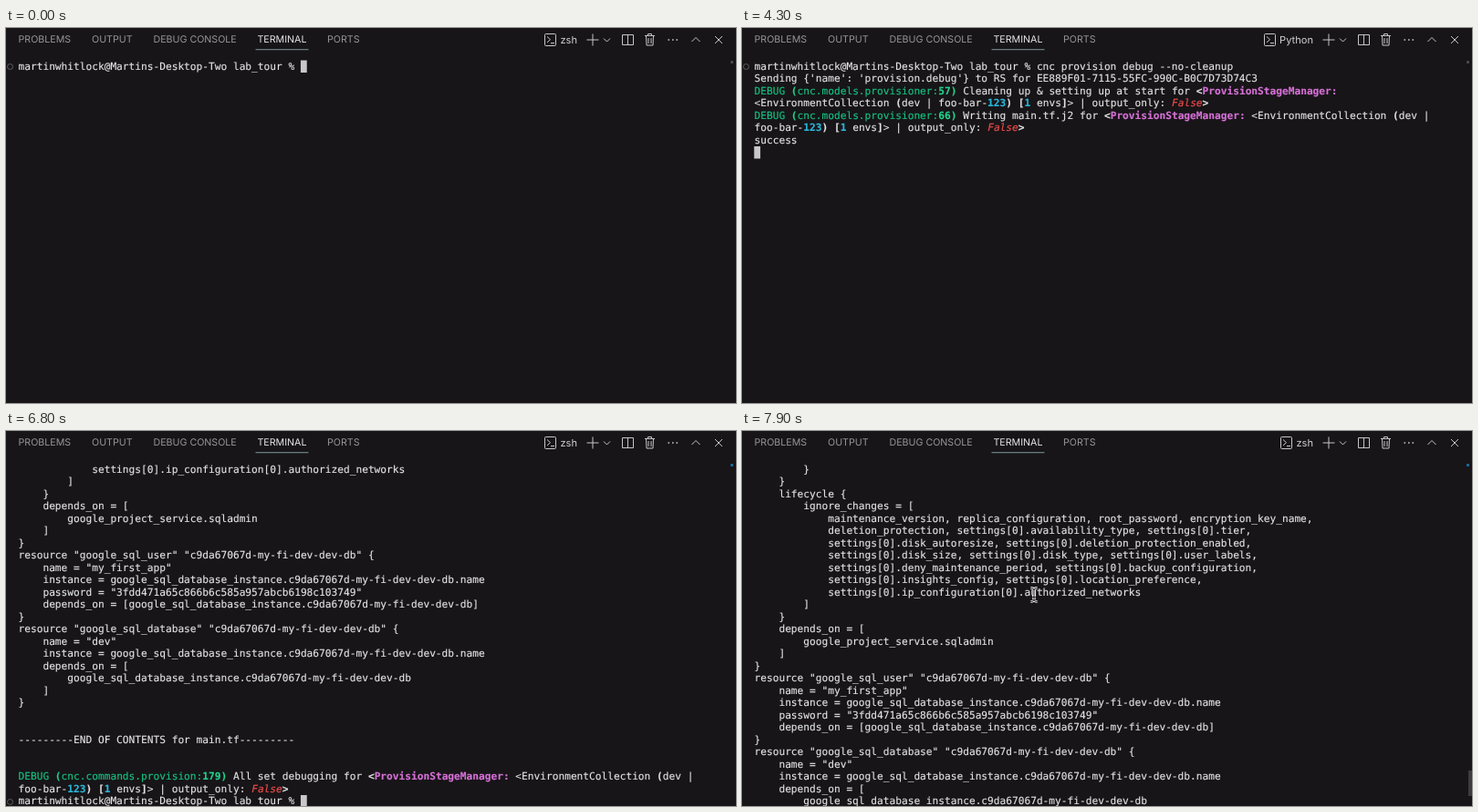
Write an HTML page that moves like this. It is 800x412 px and loops after 8 s.

```html
<!DOCTYPE html>
<html lang="en">
<head>
<meta charset="utf-8">
<title>Terminal session</title>
<style>
  html, body { margin: 0; width: 100%; height: 100%; overflow: hidden; background: #171518; }
  #stage { position: relative; width: 800px; height: 412px; overflow: hidden; background: #171518;
    text-rendering: geometricPrecision; }
  #stage > * { position: absolute; }
  .tab, #shell { top: 5px; line-height: 16px; white-space: pre; color: #979698;
    font-family: Inter, Roboto, sans-serif; font-size: 10.65px; }
  .tab.on { color: #e7e7e7; }
  #shell { right: 174px; color: #d0d0d0; font-size: 11.1px; }
  svg { left: 0; top: 0; fill: none; stroke: #c6c6c6; stroke-width: 1; }
  #screen { left: 0; top: 0; width: 800px; height: 412px; }
  .row { position: absolute; left: 13.5px; height: 13.5px; line-height: 13.5px; white-space: pre;
    color: #e2e2e2; font-family: "DejaVu Sans Mono", "Noto Sans Mono", monospace; font-size: 11.18px;
    -webkit-text-stroke: 0.15px; }
  #caret { fill: #c8c8c8; stroke: none; }
  #underline { fill: #82969a; stroke: none; }
  #ring { left: 1px; width: 5px; height: 5px; border: 1px solid #5f5e61; border-radius: 50%; }
  #dot { left: 793.5px; top: 35.5px; width: 3px; height: 3px; border-radius: 1px; }
  #thumb { left: 796px; width: 4px; height: 28px; background: #3d3c3f; }
  .b { font-weight: bold; }
  .green, .str { color: #16c280; }
  .green.b { color: #23d18b; }
  .blue { color: #3888e2; }
  .blue.b { color: #3b8eea; }
  .tag { color: #d670d6; font-weight: bold; }
  .num { color: #29b8db; font-weight: bold; }
  .yes { color: #23d18b; font-style: italic; }
  .no { color: #f14c4c; font-style: italic; }
  .url { color: #3b8eea; text-decoration: underline 1px; }
</style>
</head>
<body>
<div id="stage">
  <span class="tab" style="left:13.5px">PROBLEMS</span>
  <span class="tab" style="left:94px">OUTPUT</span>
  <span class="tab" style="left:161.5px">DEBUG CONSOLE</span>
  <span class="tab on" style="left:275.5px">TERMINAL</span>
  <span class="tab" style="left:352px">PORTS</span>
  <span id="shell"></span>
  <svg width="800" height="412">
    <rect id="underline" x="273.500" y="23.200" width="58" height="1"/>
    <g id="prompt"><rect x="590.5" y="6.5" width="12" height="13" rx="1"/><path d="M593 9.5l3.5 3.2-3.5 3.2M597 16.5h4"/></g>
    <path d="M636.5 13h13M643 6.5v13M655 11.5l3.5 3.5 3.5-3.5"/>
    <path d="M675.5 7.5h12v11h-12zM681.5 7.5v11"/>
    <path d="M700 8.5h11M703.5 8.5v-2h4v2M701.5 8.5l.5 10.5h7l.5-10.5M704 11v6M707 11v6"/>
    <path d="M725.5 13h1.6M730 13h1.6M734.5 13h1.6" stroke-width="1.6"/>
    <path d="M751.5 15l4.5-4.5 4.5 4.5M777 9l8 8M785 9l-8 8"/>
    <rect id="caret" width="6.800" height="13.500"/>
  </svg>
  <div id="screen"></div>
  <div id="ring"></div>
  <div id="dot"></div>
  <div id="thumb"></div>
  <svg id="mouse" width="16" height="22" style="left:312px;top:169px">
    <defs><path id="beam" d="M4.5 3.5q3 0 3.5 2q.5-2 3.5-2M8 5v12M4.5 18.5q3 0 3.5-2q.5 2 3.5 2M6 13.5h4"/></defs>
    <use href="#beam" stroke="#f2f2f2" stroke-width="2.8"/>
    <use href="#beam" stroke="#111"/>
  </svg>
</div>
<script>
const LOOP = 8000, TOP = 35.5, LEFT = 13.5, ROW = 13.5, COL = 6.731, VISIBLE = 28;
const $ = id => document.getElementById(id);

const prompt = 'martinwhitlock@Martins-Desktop-Two lab_tour % ';
const command = 'cnc provision debug --no-cleanup';
const env = '<EnvironmentCollection (dev | foo-bar-123) [1 envs]> | output_only: ';
const manager = '<ProvisionStageManager:';

// Log entries, already wrapped to the console width
const stage = (line, what, flag) =>
  [`DEBUG (cnc.models.provisioner:${line}) ${what} for ${manager}`, `${env}${flag}>`];
const writing = (from, what, flag) =>
  [`DEBUG (${from}) ${what} for ${manager} <EnvironmentCollection (dev |`,
   `foo-bar-123) [1 envs]> | output_only: ${flag}>`];
const tfRun = args =>
  [`INFO (cnc.models.provisioner:388) TF RUN (${manager} <EnvironmentCollection (dev | foo-bar-123) [1`,
   `envs]> | output_only: True>): [['terraform', ${args}]] 0 in 0 seconds`];
const cleanup = 'Cleaning up & setting up at start';
const install = 'Installing TF modules/providers';

const log = [
  ...stage(57, cleanup, 'False'),
  ...writing('cnc.models.provisioner:66', 'Writing main.tf.j2', 'False'),
  'success',
  'DEBUG (cnc.models.providers.google.database_resource_settings:43) No existing db secret found for <Service db',
  '(type: database)>: Your default credentials were not found. To set up Application Default Credentials, see',
  'https://cloud.google.com/docs/authentication/external/set-up-adc for more information.',
  'DEBUG (cnc.models.environment_collection:314) Going to get outputs for <EnvironmentCollection (dev | foo-bar-123)',
  '[1 envs]>: {}',
  ...stage(57, cleanup, 'True'),
  ...writing('cnc.models.provisioner:66', 'Writing main.tf.j2', 'True'),
  ...stage(142, install, 'True'),
  ...tfRun("'init'"),
  ...tfRun("'output', '-json'"),
  ...stage(142, install, 'False')
];

const config = `        }
    }
    lifecycle {
        ignore_changes = [
            maintenance_version, replica_configuration, root_password, encryption_key_name,
            deletion_protection, settings[0].availability_type, settings[0].tier,
            settings[0].disk_autoresize, settings[0].deletion_protection_enabled,
            settings[0].disk_size, settings[0].disk_type, settings[0].user_labels,
            settings[0].deny_maintenance_period, settings[0].backup_configuration,
            settings[0].insights_config, settings[0].location_preference,
            settings[0].ip_configuration[0].authorized_networks
        ]
    }
    depends_on = [
        google_project_service.sqladmin
    ]
}
resource "google_sql_user" "c9da67067d-my-fi-dev-dev-db" {
    name = "my_first_app"
    instance = google_sql_database_instance.c9da67067d-my-fi-dev-dev-db.name
    password = "3fdd471a65c866b6c585a957abcb6198c103749"
    depends_on = [google_sql_database_instance.c9da67067d-my-fi-dev-dev-db]
}
resource "google_sql_database" "c9da67067d-my-fi-dev-dev-db" {
    name = "dev"
    instance = google_sql_database_instance.c9da67067d-my-fi-dev-dev-db.name
    depends_on = [
        google_sql_database_instance.c9da67067d-my-fi-dev-dev-db
    ]
}


---------END OF CONTENTS for main.tf---------

`.split('\n');

const esc = s => s.replace(/&/g, '&amp;').replace(/</g, '&lt;').replace(/>/g, '&gt;');
const span = (cls, s) => `<span class="${cls}">${esc(s)}</span>`;

const HEAD = /^(DEBUG|INFO) \(([\w.]+:)(\d+\))/;
const TOKEN = new RegExp([
  '(?<url>https:\\S+)',
  "(?<str>'[^']*')",
  '(?<tag>(?<=(?:for |\\()<)\\w+:?)',
  '(?<yes>True)',
  '(?<no>False)',
  '(?<num>(?<![\\w.])\\d+)',
  '(?<b>(?<=for |\\()<|(?<=True|False)>|>(?=:)|[()[\\]{}])'
].join('|'), 'g');

// Colours one log line the way a console highlighter does
function paint(line) {
  let html = '', at = 0;
  const head = line.match(HEAD);
  if (head) {
    const hue = head[1] === 'INFO' ? 'blue' : 'green';
    html = span(hue, head[1] + ' ') + span(hue + ' b', '(') + span(hue, head[2]) + span(hue + ' b', head[3]);
    at = head[0].length;
  }
  const body = line.slice(at);
  at = 0;
  for (const m of body.matchAll(TOKEN)) {
    const cls = Object.keys(m.groups).find(k => m.groups[k] !== undefined);
    html += esc(body.slice(at, m.index)) + span(cls, m[0]);
    at = m.index + m[0].length;
  }
  return html + esc(body.slice(at));
}

const session = [
  esc(prompt + command),
  esc("Sending {'name': 'provision.debug'} to RS for EE889F01-7115-55FC-990C-B0C7D73D74C3"),
  ...log.map(paint)
];
const result = [
  ...config.map(esc),
  ...writing('cnc.commands.provision:179', 'All set debugging', 'False').map(paint),
  esc(prompt)
];

// [start ms, finished rows of the session]
const output = [[1500, 1], [2000, 7], [4900, 18], [5100, 20], [5300, 24]];
const DONE = 6400, SCROLL = 7400;

function view(t) {
  if (t >= DONE) {
    const step = Math.floor((t - SCROLL) / 100);
    const scroll = step < 0 ? 0 : Math.max(1, step * 2);
    const top = result.length - VISIBLE - scroll;
    const line = VISIBLE - 1 + scroll;
    return { rows: result.slice(top, top + VISIBLE), scroll, done: true, line, col: prompt.length, ring: line };
  }
  const now = output.filter(o => t >= o[0]).pop();
  if (now) return { rows: session.slice(0, now[1]), scroll: 0, line: now[1], col: 0, ring: 0 };
  const text = prompt + (t >= 500 ? command : '');
  return { rows: [esc(text)], scroll: 0, line: 0, col: text.length, ring: 0 };
}

let last = '';
function draw() {
  const t = performance.now() % LOOP;
  const v = view(t);
  const html = v.rows.map((r, i) => `<div class="row" style="top:${TOP + i * ROW}px">${r}</div>`).join('');
  if (html !== last) $('screen').innerHTML = last = html;

  $('caret').setAttribute('x', LEFT + v.col * COL - 0.2);
  $('caret').setAttribute('y', TOP + v.line * ROW);
  $('ring').style.top = TOP + 3.5 + v.ring * ROW + 'px';
  $('dot').style.background = v.done ? '#1f6f99' : '#4b4a4d';
  $('thumb').style.top = 383 - v.scroll + 'px';
  $('thumb').style.visibility = v.scroll ? 'visible' : 'hidden';
  $('mouse').style.visibility = t >= 7100 ? 'visible' : 'hidden';

  const python = t >= 1600 && t < 6500;
  $('shell').textContent = python ? 'Python' : 'zsh';
  $('prompt').setAttribute('transform', `translate(${python ? -18 : 0} 0)`);
  requestAnimationFrame(draw);
}
draw();
</script>
</body>
</html>
```
